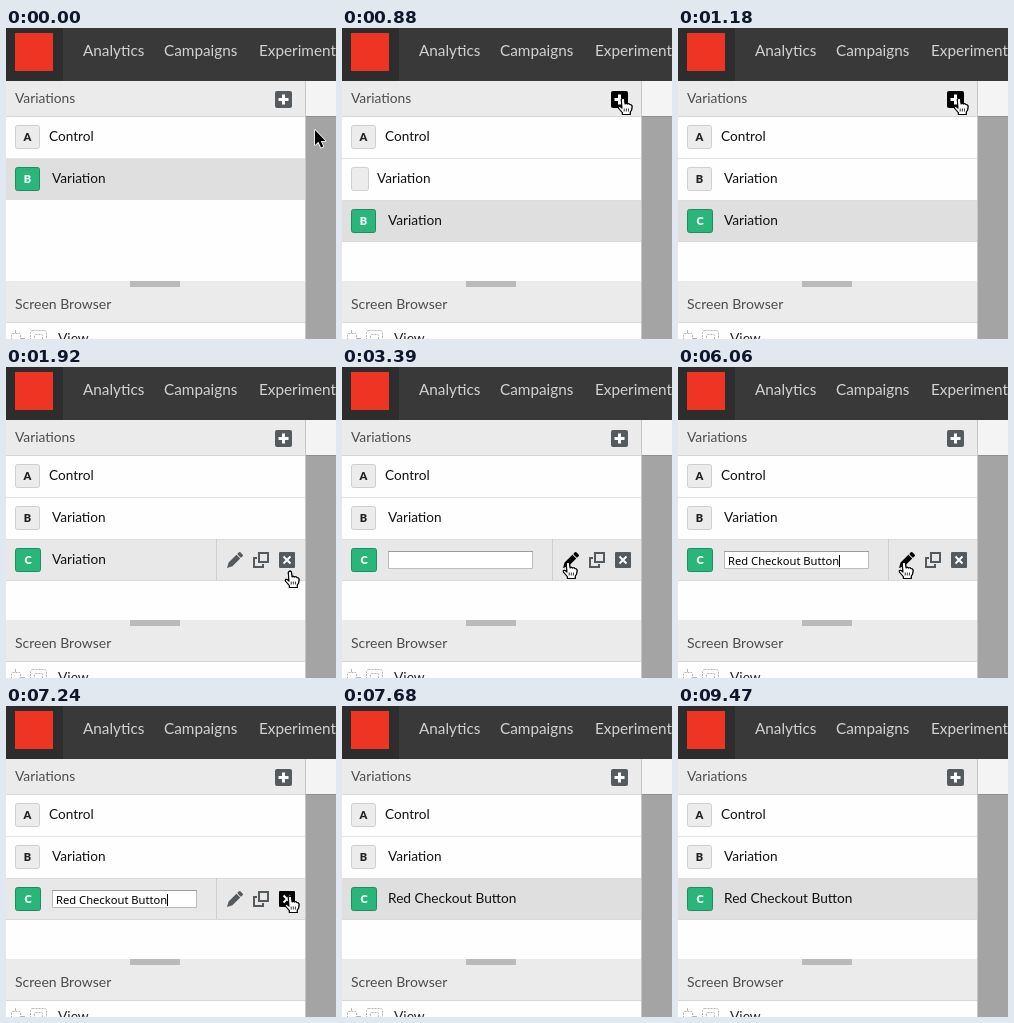
Write an HTML page with a canvas that moves like this. It is 330 by 311 pixels and loops after 9.77 s.

```html
<!DOCTYPE html>
<html lang="en">
<head>
<meta charset="utf-8">
<title>Variations panel</title>
<style>
html, body { margin: 0; width: 100%; height: 100%; overflow: hidden; }
canvas { display: block; width: 330px; height: 311px; }
</style>
</head>
<body>
<canvas id="stage" width="330" height="311"></canvas>
<script>
const ctx = document.getElementById('stage').getContext('2d');
const LOOP = 9770, TICK = 147.6;
const NAME = 'Red Checkout Button';
const UI = 'Lato, sans-serif';
const ICON = '#555a5e';

// Pointer path: tick, x, y. Between keys it moves in a straight line.
const PATH = [
  [0, 309, 102], [4, 281, 70], [8, 281, 70], [10, 317, 112], [13, 284, 204],
  [15, 279, 203], [19, 226, 195], [43, 226, 195], [49, 284, 190], [50, 318, 222]
];
const RETURN_PATH = [[62, 313, 185], [63, 318, 285]];

function rect(x, y, w, h, color) {
  ctx.fillStyle = color;
  ctx.fillRect(x, y, w, h);
}

function box(x, y, w, h, radius, fill, stroke) {
  ctx.beginPath();
  ctx.roundRect(x, y, w, h, radius);
  if (fill) { ctx.fillStyle = fill; ctx.fill(); }
  if (stroke) { ctx.strokeStyle = stroke; ctx.lineWidth = 1; ctx.stroke(); }
}

function text(str, x, y, size, color, font = UI, weight = 400, align = 'left') {
  ctx.font = `${weight} ${size}px ${font}`;
  ctx.textAlign = align;
  ctx.fillStyle = color;
  ctx.fillText(str, x, y);
}

function pointerAt(tick) {
  const path = tick <= 50 ? PATH : RETURN_PATH;
  if (tick < path[0][0] || tick > path.at(-1)[0]) return null;
  const i = Math.max(1, path.findIndex(key => key[0] >= tick));
  const [t0, x0, y0] = path[i - 1], [t1, x1, y1] = path[i];
  const k = (tick - t0) / (t1 - t0);
  return { x: x0 + (x1 - x0) * k, y: y0 + (y1 - y0) * k };
}

function inside(p, x, y, w, h) {
  return !!p && p.x >= x && p.x < x + w && p.y >= y && p.y < y + h;
}

function typedCount(tick) {
  if (tick < 24) return 0;
  if (tick < 39) return Math.min(tick, 37) - 23 + (tick >= 36 ? 1 : 0);
  return Math.min(19, [16, 18][tick - 39] ?? 19);
}

function chip(letter, y, active, w = 25) {
  box(9.5, y + 0.5, w - 1, 23, 2, active ? '#29b67a' : '#ececec', active ? '#1f8b5f' : '#cfcfcf');
  text(letter, 9 + w / 2, y + 16, 11, active ? '#fff' : '#222', UI, 900, 'center');
}

function plusIcon(hover) {
  box(269, 63, 17, 17, 2, hover ? '#000' : ICON);
  rect(276, 66.5, 3, 10, '#fff');
  rect(272.5, 70, 10, 3, '#fff');
}

function pencil(color) {
  ctx.save();
  ctx.translate(221, 201);
  ctx.rotate(-Math.PI / 4);
  ctx.fillStyle = color;
  ctx.beginPath();
  ctx.moveTo(0, 0);
  ctx.lineTo(5, -2.7);
  ctx.lineTo(16, -2.7);
  ctx.lineTo(16, 2.7);
  ctx.lineTo(5, 2.7);
  ctx.fill();
  box(17, -2.7, 3.6, 5.4, 1, color);
  ctx.restore();
}

function duplicate(color) {
  ctx.strokeStyle = color;
  ctx.lineWidth = 2;
  ctx.strokeRect(253, 186, 9, 9);
  ctx.beginPath();
  ctx.moveTo(251, 191);
  ctx.lineTo(248, 191);
  ctx.lineTo(248, 200);
  ctx.lineTo(257, 200);
  ctx.lineTo(257, 197);
  ctx.stroke();
}

function closeIcon(color) {
  box(273, 185, 16, 16, 1, color);
  ctx.strokeStyle = '#fff';
  ctx.lineWidth = 2;
  ctx.beginPath();
  ctx.moveTo(277.5, 189.5);
  ctx.lineTo(284.5, 196.5);
  ctx.moveTo(284.5, 189.5);
  ctx.lineTo(277.5, 196.5);
  ctx.stroke();
}

function tools(p) {
  const tint = x => inside(p, x, 185, 17, 17) ? '#000' : ICON;
  rect(210, 172, 1, 41, '#cdcdcd');
  pencil(tint(220));
  duplicate(tint(247));
  closeIcon(tint(273));
}

const ARROW = new Path2D('M0 0V15L3.4 11.8 6 17.6 8.3 16.6 5.8 11H10.5Z');
const HAND = new Path2D('M-1.7 1.5Q0-1.2 1.5 1.3L2 6Q3.4 4.7 4.5 6.1Q6 5.1 7 6.8Q9 6.4 9 8.6L8.6 12 7.2 14V16.5H-.6V14.5L-4.6 10Q-5 7.6-2.7 8.7L-1 10.2Z');
const FINGERS = new Path2D('M1.2 10.5V13.5M3.3 10.5V13.5M5.4 10.5V13.5');

function drawPointer(p, hand) {
  ctx.save();
  ctx.translate(p.x, p.y);
  ctx.lineJoin = 'round';
  ctx.lineWidth = hand ? 1.1 : 1.6;
  ctx.fillStyle = hand ? '#fff' : '#000';
  ctx.strokeStyle = hand ? '#000' : '#fff';
  ctx.stroke(hand ? HAND : ARROW);
  ctx.fill(hand ? HAND : ARROW);
  if (hand) {
    ctx.stroke(HAND);
    ctx.lineWidth = 0.8;
    ctx.stroke(FINGERS);
  }
  ctx.restore();
}

function drawFrame() {
  rect(0, 0, 330, 311, '#fefefe');
  rect(0, 0, 330, 53, '#393939');
  rect(0, 0, 57, 53, '#2d2d2d');
  rect(9, 5, 38, 38, '#ee3524');
  text('Analytics', 77, 28, 15.3, '#d2d2d2');
  text('Campaigns', 158, 28, 15.3, '#d2d2d2');
  text('Experiment', 253, 28, 15.3, '#d2d2d2');

  rect(300, 53, 30, 35, '#f4f4f4');
  rect(300, 88, 30, 223, '#a4a4a4');
  rect(300, 88, 30, 1, '#8f8f8f');

  rect(0, 53, 299, 35, '#ebebeb');
  rect(0, 88, 299, 1, '#d6d6d6');
  text('Variations', 9, 75, 13.8, '#4c4c4c');

  rect(0, 253, 299, 41, '#ebebeb');
  rect(0, 294, 299, 1, '#d6d6d6');
  rect(124, 253, 50, 6, '#bababa');
  text('Screen Browser', 9, 281, 14, '#4c4c4c');
  text('View', 52, 315, 13.8, '#222');

  ctx.setLineDash([2, 1]);
  box(5.5, 305.5, 9, 9, 1, null, '#b5b5b5');
  box(24.5, 302.5, 16, 14, 2, null, '#b5b5b5');
  box(28.5, 306.5, 8, 10, 1, null, '#b5b5b5');
  ctx.setLineDash([]);
  rect(15, 310, 4, 1, '#b5b5b5');
  rect(9, 302, 1, 3, '#b5b5b5');
  rect(299, 53, 1, 258, '#c6c6c6');
}

function drawInput(tick) {
  box(46.5, 184.5, 144, 17, 0, '#fff', '#bcbcbc');
  rect(46, 184, 145, 1, '#9c9c9c');
  const typed = NAME.slice(0, typedCount(tick));
  text(typed, 50, 198, 11.2, '#000', '"Noto Sans", sans-serif');
  const caretOn = !(tick === 23 || (tick >= 45 && tick < 49));
  if (caretOn) rect(Math.round(50 + ctx.measureText(typed).width), 188, 1, 12, '#000');
}

function drawRows(tick, p, hovered) {
  chip('A', 97, false);
  text('Control', 43, 113, 13.6, '#111');
  rect(0, 130, 299, 1, '#e4e4e4');

  if (tick < 6) {
    rect(0, 131, 299, 41, '#dfdfdf');
    chip('B', 139, true);
    text('Variation', 46, 155, 13.6, '#111');
    return;
  }

  const labelled = tick >= 8;
  chip(labelled ? 'B' : '', 139, false, labelled ? 25 : 18);
  text('Variation', labelled ? 46 : 35, 155, 13.6, '#111');
  rect(0, 172, 299, 42, hovered ? '#e8e8e8' : '#dfdfdf');
  rect(0, 172, 299, 1, '#dcdcdc');
  rect(0, 213, 299, 1, '#d9d9d9');
  chip(labelled ? 'C' : 'B', 181, true, labelled ? 26 : 25);
  if (tick >= 19 && tick < 52) drawInput(tick);
  else text(tick < 19 ? 'Variation' : NAME, 46, 197, 13.7, '#111');
  if (hovered) tools(p);
}

function render(ms) {
  const tick = Math.floor((ms % LOOP) / TICK + 0.06);
  const p = pointerAt(tick);
  const onPlus = inside(p, 269, 63, 17, 17);
  const onRow = tick >= 8 && inside(p, 0, 172, 299, 42);
  drawFrame();
  plusIcon(onPlus);
  drawRows(tick, p, onRow);
  if (p) drawPointer(p, onPlus || onRow);
}

let start;
function loop(now) {
  start ??= now;
  render(now - start);
  requestAnimationFrame(loop);
}
render(0);
requestAnimationFrame(loop);
</script>
</body>
</html>
```
